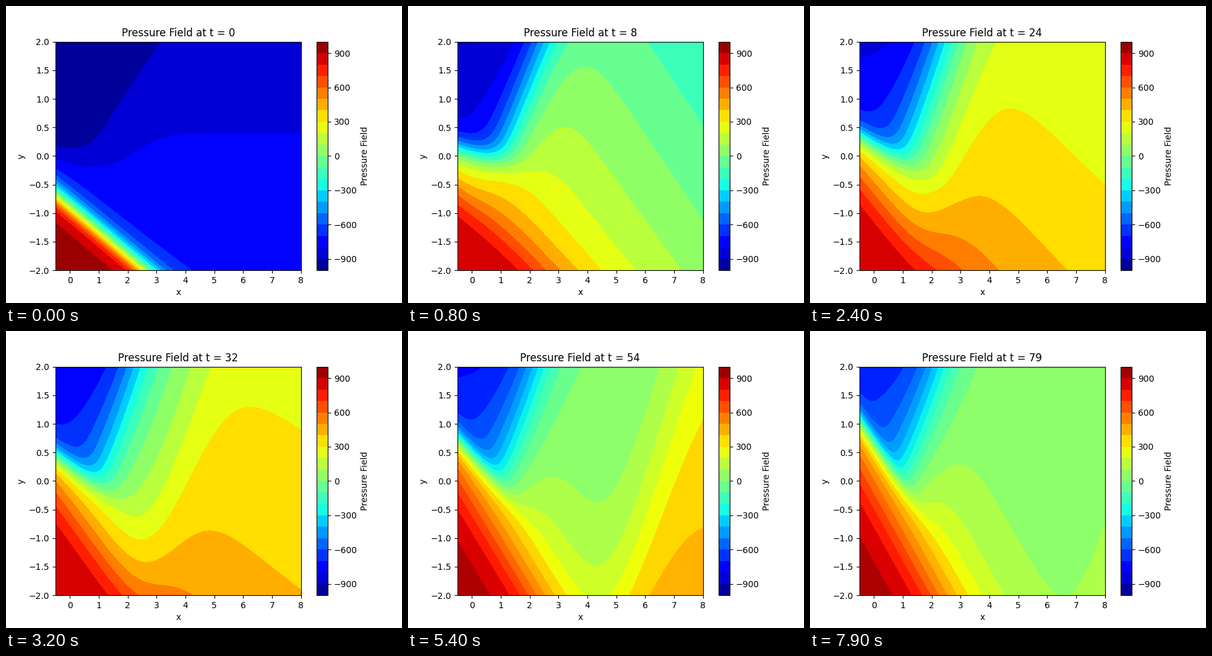
Write a matplotlib script that moves like this. It is 640 by 480 pixels and loops after 8000 ms.

```python
import numpy as np
import matplotlib.pyplot as plt
from matplotlib.animation import FuncAnimation

FRAMES, INTERVAL = 80, 100

X, Y = np.meshgrid(np.linspace(-0.5, 8, 256), np.linspace(-2, 2, 161))


def step(z):
    """Smooth step from 0 to 1."""
    return 1 / (1 + np.exp(-z))


def mix(a, b, m):
    return a + (b - a) * m


def pressure(t):
    """A plateau drifting downstream, a high at lower left, a low at upper left."""
    start, settle = np.exp(-t / 5), np.exp(-t / 12)
    surge = settle - start

    # plateau on the right, and the calmer level its moving edge uncovers
    plateau = (400 - 1080 * start - 110 * np.exp(-t / 30)
               - 140 * surge * (X - 4) - (25 + 100 * surge) * Y)
    calm = 15 - 170 * np.exp(-t / 20) - 640 * start ** 2
    edge = 0.127 * t - 0.6 + 0.5 * Y
    p = mix(calm, plateau, step((X - edge) / 0.55))

    # high pressure, falling off with the slanted distance from the corner
    slant = 1.05 + 1.3 * np.exp(-t / 25)
    dist = np.maximum(X + slant * (Y + 2), 0)
    high = 1 / (1 + (dist / 2.65) ** (3 + 5 * start ** 2))
    p = mix(p, 892 + 22 * start, high)

    # low pressure between a tilting lower edge and a steep right edge
    floor = -0.12 - (0.12 + 0.0085 * t) * (X - 1)
    wall = 2.25 + 0.9 * start + (0.55 + 0.6 * start) * (Y - 2)
    low = step((Y - floor) / 0.13) * step((wall - X) / 0.48)
    depth = -660 - 300 * np.exp(-t / 40) + 70 * (1 - start) * (2 - Y)
    return np.clip(mix(p, depth, low), -995, 995)


def contours(t):
    gap, top = (100, 1000) if t < 41 else (80, 1040)
    return ax.contourf(X, Y, pressure(t), levels=np.arange(-top, top + 1, gap),
                       cmap="jet", vmin=-1000, vmax=1000)


fig, ax = plt.subplots(figsize=(6.4, 4.8), dpi=100)
filled = contours(0)
fig.colorbar(filled, ax=ax, label="Pressure Field", ticks=range(-900, 901, 300))
ax.set(xlabel="x", ylabel="y", xlim=(-0.5, 8), ylim=(-2, 2))


def update(t):
    global filled
    filled.remove()
    filled = contours(t)
    ax.set_title(f"Pressure Field at t = {t}")
    return filled,


anim = FuncAnimation(fig, update, frames=FRAMES, interval=INTERVAL,
                     init_func=lambda: (), repeat=True, repeat_delay=0)
plt.show()
```
